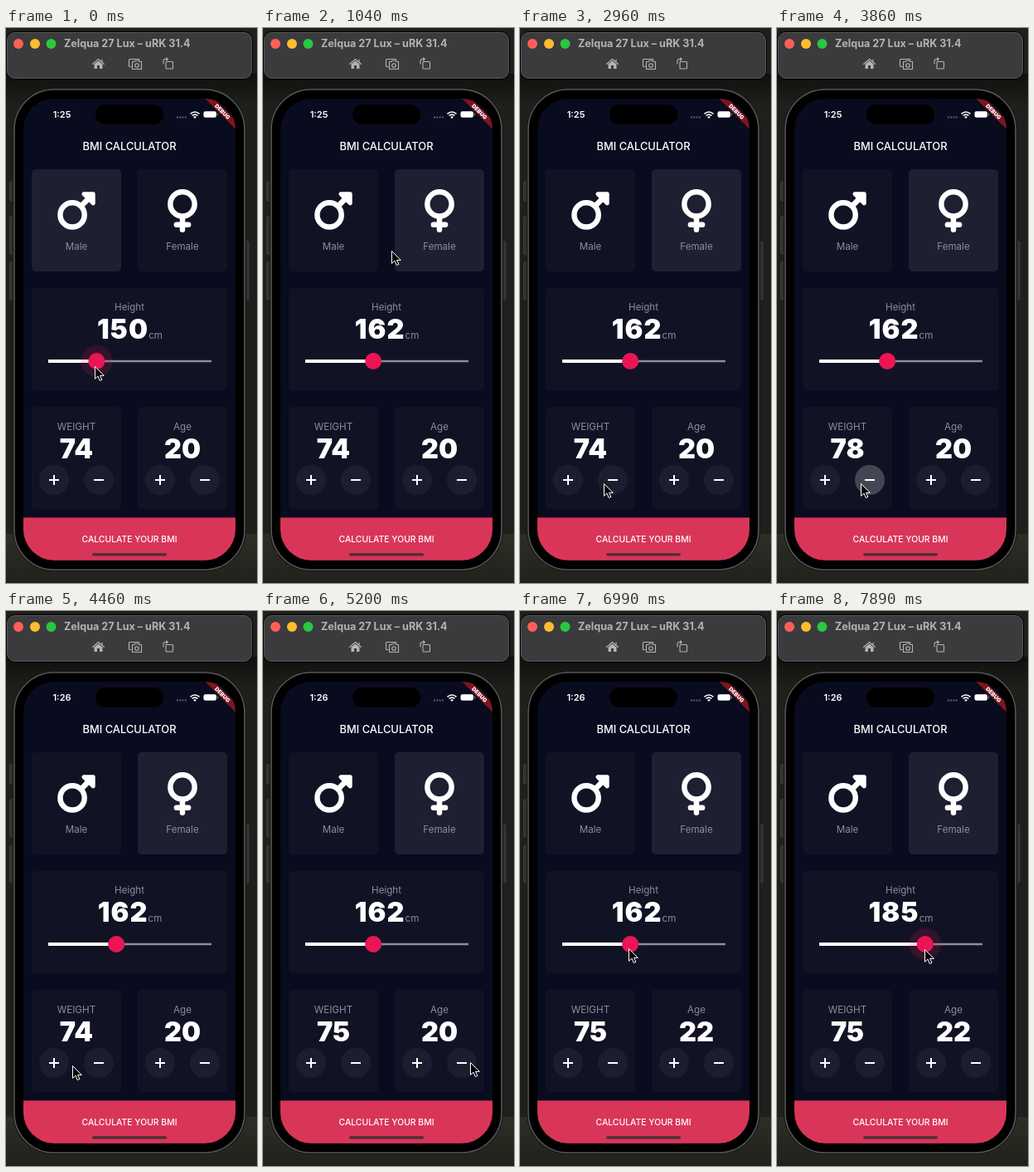
Recreate the animation shown at these times as an HTML page. Size 303 px wide and 668 px high, loop 8000 ms.

```html
<!DOCTYPE html>
<html lang="en">
<head>
<meta charset="utf-8">
<title>BMI calculator</title>
<style>
  html, body { margin: 0; width: 100%; height: 100%; overflow: hidden; background: #1e1f1a; }
  svg { display: block; width: 303px; height: 668px; font-family: Inter, sans-serif; }
  .mid { text-anchor: middle; }
  .label { font-size: 11.6px; fill: #8d8e98; }
  .num { font-size: 32.5px; font-weight: 900; fill: #fff; }
  #height { letter-spacing: 1.1px; }
  .card { fill: #111325; }
  .card.on { fill: #1e1f30; }
  .btn circle { fill: #1c1e2f; }
  .btn.on circle { fill: #454653; }
  .btn path { stroke: #fff; stroke-width: 2; fill: none; }
  .tool { fill: none; stroke: #b4b4b6; stroke-width: 1.1; stroke-linejoin: round; stroke-linecap: round; }
  .sign { fill: none; stroke: #fff; stroke-width: 64; stroke-linecap: round; stroke-linejoin: round; }
</style>
</head>
<body>
<svg viewBox="0 0 303 668">
  <defs>
    <linearGradient id="shade" x2="0" y2="1">
      <stop offset="0" stop-opacity=".5"/>
      <stop offset="1" stop-opacity="0"/>
    </linearGradient>
    <linearGradient id="floor" x2="0" y2="1">
      <stop offset="0" stop-color="#2d2e25"/>
      <stop offset="1" stop-color="#20211b"/>
    </linearGradient>
    <clipPath id="screen"><rect x="21" y="85" width="256" height="555.7" rx="37"/></clipPath>
  </defs>
  <rect width="303" height="668" fill="#1f201b"/>
  <rect y="609" width="303" height="59" fill="url(#floor)"/>
  <rect y="55" width="303" height="40" fill="url(#shade)"/>

  <!-- window bar -->
  <rect x=".5" y="4.5" width="297" height="57" rx="10" stroke="#000"/>
  <rect x="1.5" y="5.5" width="295" height="55" rx="9" fill="#3b3b3d" stroke="#58585a"/>
  <circle cx="15" cy="19" r="6" fill="#fe5f57"/>
  <circle cx="35" cy="19" r="6" fill="#febc2e"/>
  <circle cx="54.5" cy="19" r="6" fill="#28c840"/>
  <text x="70" y="23.3" font-size="12.6" font-weight="700" fill="#b3b3b5">Zelqua 27 Lux – uRK 31.4</text>
  <g class="tool">
    <path d="M104.5 43.5L111.5 37.5L118.500 43.5M116 41V38"/>
    <path d="M106.500 43.5L111.5 39.500L116.5 43.5V49H113V45H110V49H106.5Z" fill="#b4b4b6" stroke="none"/>
    <path d="M151 46.5H149.5Q148.5 46.5 148.5 45.5V38.5Q148.5 37.5 149.5 37.5H160Q161 37.5 161 38.5"/>
    <path d="M152.5 40.5H155L156 39.3H160L161 40.5H163.5V49.5H152.5Z"/>
    <circle cx="158" cy="45" r="2.3"/>
    <rect x="193" y="40.5" width="8.5" height="8.5" rx="1"/>
    <path d="M190 43V40Q190 37.5 192.5 37.5H195M193.5 35.8L195.3 37.5L193.5 39.2"/>
  </g>

  <!-- phone body -->
  <g fill="#303031" stroke="#4a4a4b" stroke-width=".7">
    <rect x="4.5" y="185" width="6" height="23" rx="1.5"/>
    <rect x="4.5" y="227" width="6" height="45" rx="1.5"/>
    <rect x="4.5" y="282" width="6" height="45" rx="1.5"/>
    <rect x="287" y="257" width="6" height="70" rx="1.5"/>
  </g>
  <rect x="8" y="72" width="282" height="582" rx="50" fill="#171718"/>
  <rect x="10" y="74" width="278" height="578" rx="48" fill="#000" stroke="#555557" stroke-width="1.6"/>

  <g clip-path="url(#screen)">
    <rect x="21" y="85" width="256" height="556" fill="#090b1e"/>
    <text id="clock" class="mid" x="67.5" y="108" font-size="11" font-weight="600" fill="#fff">1:25</text>
    <rect x="108" y="92" width="82" height="24" rx="12" fill="#000"/>
    <path d="M206 107.5H218" stroke="#5d5e6b" stroke-width="2" stroke-dasharray="2 1.3"/>
    <path d="M222.5 103.3Q228 98.7 233.5 103.3M224.5 105.5Q228 102.7 231.5 105.5" fill="none" stroke="#fff" stroke-width="1.6"/>
    <path d="M226 107Q228 105.6 230 107L228 109Z" fill="#fff"/>
    <rect x="238.5" y="100.3" width="15.5" height="7.4" rx="2.3" fill="#fff"/>
    <path d="M255.5 102.5V105.5" stroke="#888995"/>
    <text class="mid" x="149" y="146.5" font-size="12.9" font-weight="500" fill="#fff">BMI CALCULATOR</text>

    <g id="cards"></g>

    <g class="sign" transform="translate(62.2 194) scale(.1016)">
      <circle cx="176" cy="304" r="144"/>
      <path d="M282 198L390 90" stroke-linecap="butt"/>
      <path d="M312 56H424V168Z" fill="#fff" stroke-width="48"/>
    </g>
    <g class="sign" transform="translate(193.500 194) scale(.1016)">
      <circle cx="192" cy="176" r="144"/>
      <path d="M192 330V480M122 420H262"/>
    </g>

    <g class="label mid">
      <text x="85" y="267">Male</text>
      <text x="213" y="267">Female</text>
      <text x="149" y="340">Height</text>
      <text x="85" y="484">WEIGHT</text>
      <text x="213" y="484">Age</text>
    </g>
    <text class="mid" x="149.5" y="374.3"><tspan id="height" class="num">150</tspan><tspan class="label">cm</tspan></text>
    <text id="weight" class="num mid" x="85" y="518.3">74</text>
    <text id="age" class="num mid" x="213" y="518.3">20</text>

    <path d="M51 401H248" stroke="#8d8e98" stroke-width="2.6"/>
    <path id="fill" stroke="#fff" stroke-width="3.8"/>
    <g id="thumb" fill="#eb1555">
      <circle id="halo" cy="401" r="19" opacity=".16"/>
      <circle cy="401" r="10"/>
    </g>
    <g id="buttons"></g>

    <rect x="21" y="589.3" width="256" height="52" fill="#d93559"/>
    <text class="mid" x="149" y="618.7" font-size="10.4" font-weight="500" fill="#fff">CALCULATE YOUR BMI</text>
    <rect x="104" y="632" width="90" height="3.6" rx="1.8" fill="#50303a"/>

    <g transform="translate(277 85) rotate(45)">
      <rect x="-27" y="18.2" width="54" height="7.8" fill="#7b1620"/>
      <text class="mid" y="24.5" font-size="6.6" font-weight="900" fill="#fff">DEBUG</text>
    </g>
  </g>

  <path id="cursor" d="M0 0V14.8L3.5 11.6L5.8 17L8.4 15.8L6 10.9H10.8Z" fill="#000" stroke="#fff"/>
</svg>
<script>
const LOOP = 8000, TICK = 148.7, LAST = 54;
const $ = id => document.getElementById(id);

const spots = {
  low: [107, 407], mid: [131, 406], high: [178, 407],
  male: [104, 243], gap: [155, 268], female: [206, 262],
  weightPlus: [58, 546], weightMinus: [101, 548], agePlus: [189, 544], ageMinus: [250, 543]
};
const buttonNames = ["weightPlus", "weightMinus", "agePlus", "ageMinus"];

// The pointer's stops: spot, arrival tick, departure tick, clicks made there.
const visits = [
  ["low", 0, 1], ["mid", 3, 3],
  ["female", 6, 6], ["gap", 7, 7], ["male", 8, 8], ["female", 10, 11], ["male", 13, 13], ["female", 16, 16],
  ["weightMinus", 20, 22], ["weightPlus", 23, 25, 5], ["weightMinus", 26, 29, 5], ["weightPlus", 31, 31, 1],
  ["ageMinus", 35, 35], ["ageMinus", 36, 37, 1], ["agePlus", 39, 42, 4], ["ageMinus", 43, 43, 1],
  ["mid", 46, 48], ["high", 50, LAST]
].map(([spot, from, to, clicks = 0]) => ({ spot, from, to, clicks }));

const DRAG_END = 3, DRAG_AGAIN = 49, MINUTE = 28;
const clamp = v => Math.min(1, Math.max(0, v));
const ease = v => v * v * (3 - 2 * v);

function pointerAt(n) {
  const i = visits.findLastIndex(v => v.from <= n);
  const here = visits[i], next = visits[i + 1] || here;
  const k = n > here.to ? ease((n - here.to) / (next.from - here.to)) : 0;
  const [a, b] = [spots[here.spot], spots[next.spot]];
  return a.map((p, axis) => p + (b[axis] - p) * k);
}

// Clicks are spread evenly over the ticks of a visit.
const clicksOn = (spot, n) => visits.filter(v => v.spot === spot).reduce((sum, v) =>
  sum + Math.round(v.clicks * clamp((n - v.from + 1) / (v.to - v.from + 1))), 0);
const counter = (name, first, n) => first + clicksOn(name + "Plus", n) - clicksOn(name + "Minus", n);

$("cards").innerHTML = [[31, 170, 108], [159, 170, 108], [31, 313, 236], [31, 456, 108], [159, 456, 108]]
  .map(([x, y, w]) => `<rect class="card" x="${x}" y="${y}" width="${w}" height="123" rx="5"/>`).join("");
$("buttons").innerHTML = [58, 112, 186, 240].map((x, i) =>
  `<g class="btn" transform="translate(${x} 544)"><circle r="18"/><path d="M-6 0H6${i % 2 ? "" : "M0 -6V6"}"/></g>`).join("");
const cards = [...$("cards").children], buttons = [...$("buttons").children];

function draw(n) {
  const held = n < DRAG_AGAIN ? Math.min(n, DRAG_END) : n;
  const steps = Math.round((pointerAt(held)[0] - 48.5) / 1.98);
  const x = 50 + steps * 1.98;
  $("thumb").setAttribute("transform", `translate(${x} 0)`);
  $("fill").setAttribute("d", `M51 401H${x}`);
  $("halo").style.display = held === n ? "" : "none";

  $("height").textContent = 120 + steps;
  $("weight").textContent = counter("weight", 74, n);
  $("age").textContent = counter("age", 20, n);
  $("clock").textContent = n < MINUTE ? "1:25" : "1:26";

  const chosen = visits.findLast(v => v.from <= n && /male$/.test(v.spot))?.spot ?? "male";
  ["male", "female"].forEach((name, i) => cards[i].classList.toggle("on", name === chosen));
  const pressed = visits.find(v => v.clicks && v.from <= n && n <= v.to)?.spot;
  buttonNames.forEach((name, i) => buttons[i].classList.toggle("on", name === pressed));

  const [px, py] = pointerAt(n);
  $("cursor").setAttribute("transform", `translate(${Math.round(px) + .5} ${Math.round(py) + .5})`);
}

const start = performance.now();
let shown = -1;
function frame() {
  const t = (performance.now() - start) % LOOP;
  const n = Math.min(LAST, Math.floor((t + 14) / TICK));
  if (n !== shown) draw(shown = n);
  requestAnimationFrame(frame);
}
frame();
</script>
</body>
</html>
```
